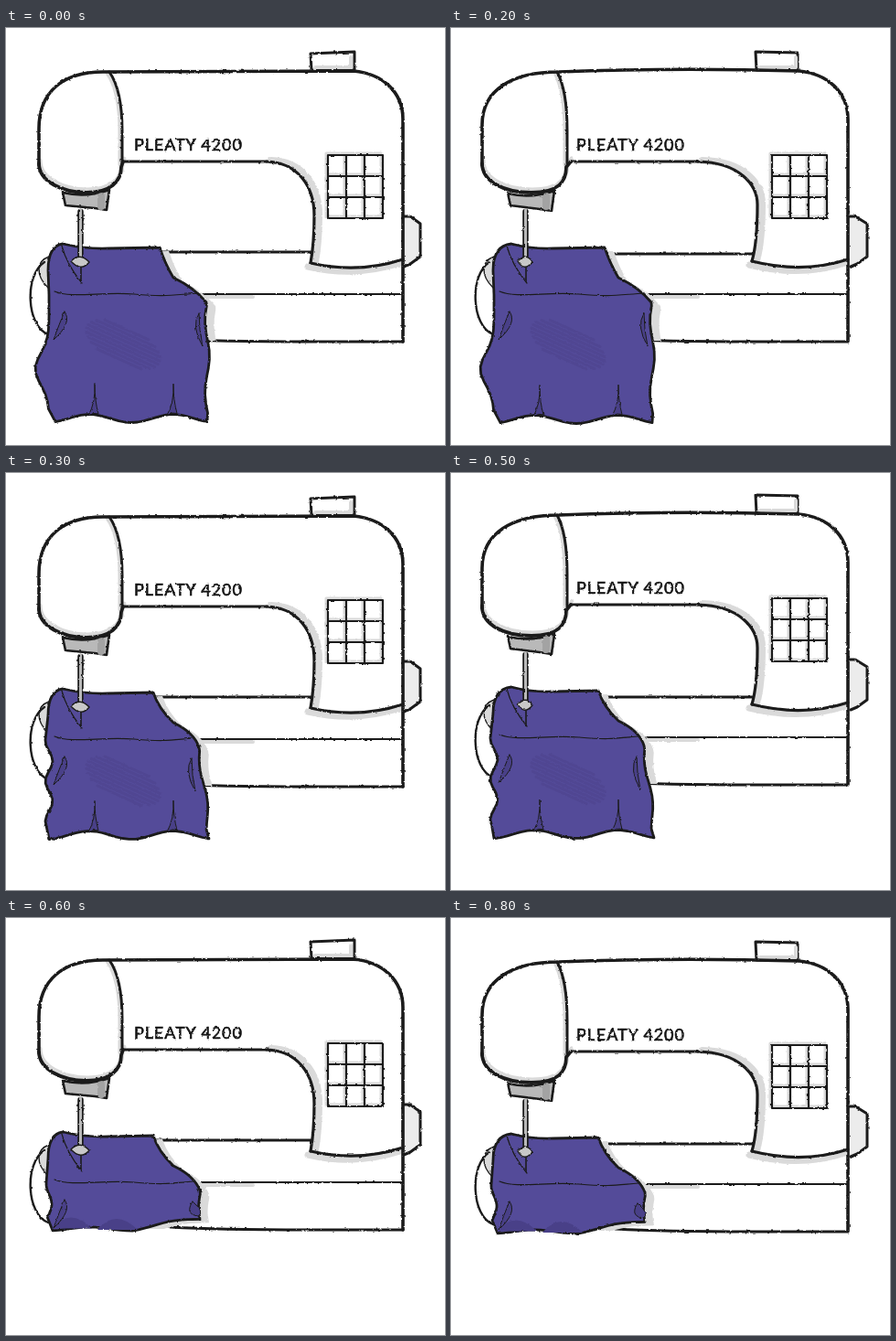
Animation, 480 px wide and 456 px high, one loop 900 ms. Source, as an HTML page:

```html
<!DOCTYPE html>
<html lang="en">
<head>
<meta charset="utf-8">
<title>Sewing machine</title>
<style>
  html, body { margin: 0; width: 100%; height: 100%; overflow: hidden; background: #fff; }
  svg { display: block; width: 100%; height: 100%; }
  path { stroke-linecap: round; stroke-linejoin: round; }
  text { font: 18px Lato, sans-serif; letter-spacing: .9px; fill: #141414; stroke: #141414; stroke-width: .6px; }
  .frame { visibility: hidden; animation: show .9s step-end infinite; }
  @keyframes show {
    0% { visibility: visible; }
    11.1111%, 100% { visibility: hidden; }
  }
</style>
</head>
<body>
<svg id="stage" viewBox="0 0 480 456"></svg>
<script>
const INK = '#1b1b1b', SHADE = '#dadada', STEEL = '#b9b9b9', CLOTH = '#544b99', FOLD = '#494088';
const FLOOR = 343, POSES = 3, FRAMES = 9;

const line = (d, width, color = INK, dx = 0, dy = 0) =>
  `<path d="${d}" transform="translate(${dx} ${dy})" fill="none" stroke="${color}" stroke-width="${width}"/>`;
const shape = (d, fill, width = 0) =>
  `<path d="${d}" fill="${fill}" stroke="${width ? INK : 'none'}" stroke-width="${width}"/>`;

function sample(from, to, steps, point) {
  let d = '';
  for (let i = 0; i <= steps; i++) {
    d += 'L' + point(from + (to - from) * i / steps).map(v => v.toFixed(1));
  }
  return d;
}

function grid(t) {
  const x = 352 - t, y = 139;
  let d = '';
  for (let i = 0; i < 4; i++) d += `M${x + 20 * i},${y}v69M${x},${y + 23 * i}h60`;
  return line(d, 3, SHADE, -2, -2) + line(d, 2.2);
}

// t blends the drawing between its two poses.
function machine(t) {
  const left = 36 - 2 * t, side = 337 - 2 * t, foot = 333 - 4 * t, corner = 98 + 12 * t;
  const body = `M${left},150V${110 - 4 * t}C${left},${70 - 2 * t} ${62 + 4 * t},48 ${corner + 8},48
    Q245,${47 - 4 * t} 380,47C412,50 434,70 434,100V${FLOOR - t}`;
  const chin = `M${left},148C${left},168 ${62 - 4 * t},180 88,180S126,168 126,152L${128 + 3 * t},146`;
  const cheek = `M${113 + 3 * t},48Q127,68 127,112V148`;
  const arch = `M${285 - 15 * t},146C${318 - 2 * t},147 ${side},172 ${side},${205 - 12 * t}Q${side},235 ${foot},${257 - 2 * t}`;
  const base = `M${foot},${257 - 2 * t}Q385,269 434,253`;
  const bedEnd = 'M47,250C33,255 32,270 46,284';

  return line(cheek, 5, SHADE, -2, 1) + line(chin, 5, SHADE, 1, -3)
    + line(arch, 8, SHADE, 5, -1) + line(base, 7, SHADE, -3, 4)
    + shape(bedEnd, SHADE, 1.4)
    + shape(`M435,206h7l${11 + 2 * t},8v36l-11,8l-7,3`, '#ececec', 3)
    + shape(`M333,${28 - 2 * t}L${381 - 2 * t},${26 + t}V46H334Z`, '#fff', 3)
    + line('M338,43H377V32', 4, SHADE)
    + grid(t)
    + shape(`M62,180l3,14l32,${3 + t}l13,2l3,-22q-25,9 -51,3`, STEEL, 2.6)
    + line('M104,184v11', 8, '#a3a3a3')
    + line(body, 3.6) + line(chin, 3.8) + line(cheek, 3)
    + line(`M${128 + 3 * t},146H${285 - 15 * t}`, 3) + line(arch, 3.2) + line(base, 3.2)
    + line(`M160,${245 + 2 * t}H${foot}`, 2.8)
    + line(`M180,340Q230,${FLOOR} 330,${FLOOR}H434`, 3)
    + line('M42,256C20,270 22,326 46,335', 2.4)
    + line('M200,294h70', 4, SHADE) + line('M200,291H432', 2.2)
    + `<text x="${140 - 3 * t}" y="133.5">PLEATY 4200</text>`;
}

// Each seam shortens the cloth: hem height, lower corners, shape of the sides and of the hem.
const stages = [
  { hem: 427, from: 54, to: 220, top: 168, shoulder: 220, drift: 0, ripple: 0, bulge: 15, wave: 4.5, tilt: 0 },
  { hem: 396, from: 47, to: 222, top: 161, shoulder: 212, drift: .1, ripple: 4, bulge: 0, wave: 4.5, tilt: 0 },
  { hem: 342, from: 51, to: 212, top: 161, shoulder: 213, drift: 0, ripple: 3, bulge: 0, wave: 2, tilt: .16 }
];

function hatching(y) {
  let d = '';
  for (let i = -4; i <= 4; i++) {
    const half = 40 * Math.sqrt(1 - i * i / 25);
    d += `M${128 - i - half},${y + i * 4 - half * .45}l${half * 2},${half * .9}`;
  }
  return `<g opacity=".4">${line(d, 3, FOLD)}</g>`;
}

function cloth(s, t) {
  const hemAt = x => s.hem + t + s.wave * Math.cos((x - 137) * Math.PI / 46) - s.tilt * Math.max(0, x - 140);
  const leftAt = y => 47 + s.ripple * Math.cos((y - 315) / 7) - s.bulge * Math.exp(-(((y - 373) / 24) ** 2));
  const rightAt = y => s.shoulder + s.drift * (y - 300) - 2.5 * Math.cos((y - 320) / 12.5);
  const long = s.hem > 380;

  const outline = `M46,265Q46,238 ${62 + 4 * t},236Q88,242 112,241L${s.top},240
    Q${s.top + 6},258 183,273Q206,284 ${s.shoulder - 1},300`
    + sample(304, hemAt(s.to) - 10, 12, y => [rightAt(y), y])
    + sample(s.to, s.from, 24, x => [x, hemAt(x)])
    + sample(hemAt(s.from) - 14, 292, 16, y => [leftAt(y), y]) + 'Z';

  const pleat = x => {
    const tip = hemAt(x) - 33;
    return shape(`M${x},${tip}q1,20 -7,34q6,-4 11,-2q-4,-14 -4,-32`, FOLD, 1);
  };
  const crease = x => shape(`M${x - 22},${hemAt(x)}q20,-24 44,0`, FOLD);

  return `<g clip-path="url(#bed)"><g transform="translate(10 4)">${shape(outline, SHADE)}</g></g>`
    + shape(outline, CLOTH, 2.8)
    + (long ? hatching(s.hem * .3 + 218) : '')
    + (long ? [97, 183].map(pleat) : [72, 122].map(crease)).join('')
    + shape('M64,310Q73,322 52,341Q58,324 64,310', FOLD, 1)
    + shape(`M${s.shoulder - 9},312q-9,14 ${long ? '4,36q-4,-18 -4,-36' : '6,16q8,-4 -6,-16'}`, FOLD, 1)
    + line(`M53,288C72,296 105,288 140,291S180,292 ${s.shoulder - 8},290`, 1.2)
    + line('M61,238Q66,258 83,279', 1.2);
}

const needle = t =>
  line('M82,262V277', 1.6)
  + line('M81.5,201V250', 6.5) + line('M81.5,199V251', 3, STEEL)
  + shape(`M${71 + 2 * t},255q10,-10 ${20 - 4 * t},1q-9,11 -${20 - 4 * t},-1`, '#c8c8c8', 1.4);

const filters = Array.from({ length: POSES }, (_, i) => `<filter id="rough${i}" filterUnits="userSpaceOnUse"
    x="0" y="0" width="480" height="456" color-interpolation-filters="sRGB">
    <feTurbulence type="fractalNoise" baseFrequency=".25" numOctaves="2" seed="${i + 3}"/>
    <feDisplacementMap in="SourceGraphic" scale="2.4" xChannelSelector="R" yChannelSelector="G"/>
  </filter>`).join('');

const frames = Array.from({ length: FRAMES }, (_, i) => {
  const pose = i % POSES, t = pose / (POSES - 1), lift = i > 3 && i < 8 ? -2 : 0;
  return `<g class="frame" style="animation-delay:${(i - FRAMES) * 100}ms">
    <g filter="url(#rough${pose})"><g transform="translate(0 ${lift})">
      ${machine(t)}${cloth(stages[Math.floor(i / POSES)], t)}${needle(t)}
    </g></g></g>`;
}).join('');

document.getElementById('stage').innerHTML =
  `<defs>${filters}<clipPath id="bed"><rect x="150" y="240" width="100" height="102"/></clipPath></defs>${frames}`;
</script>
</body>
</html>
```
